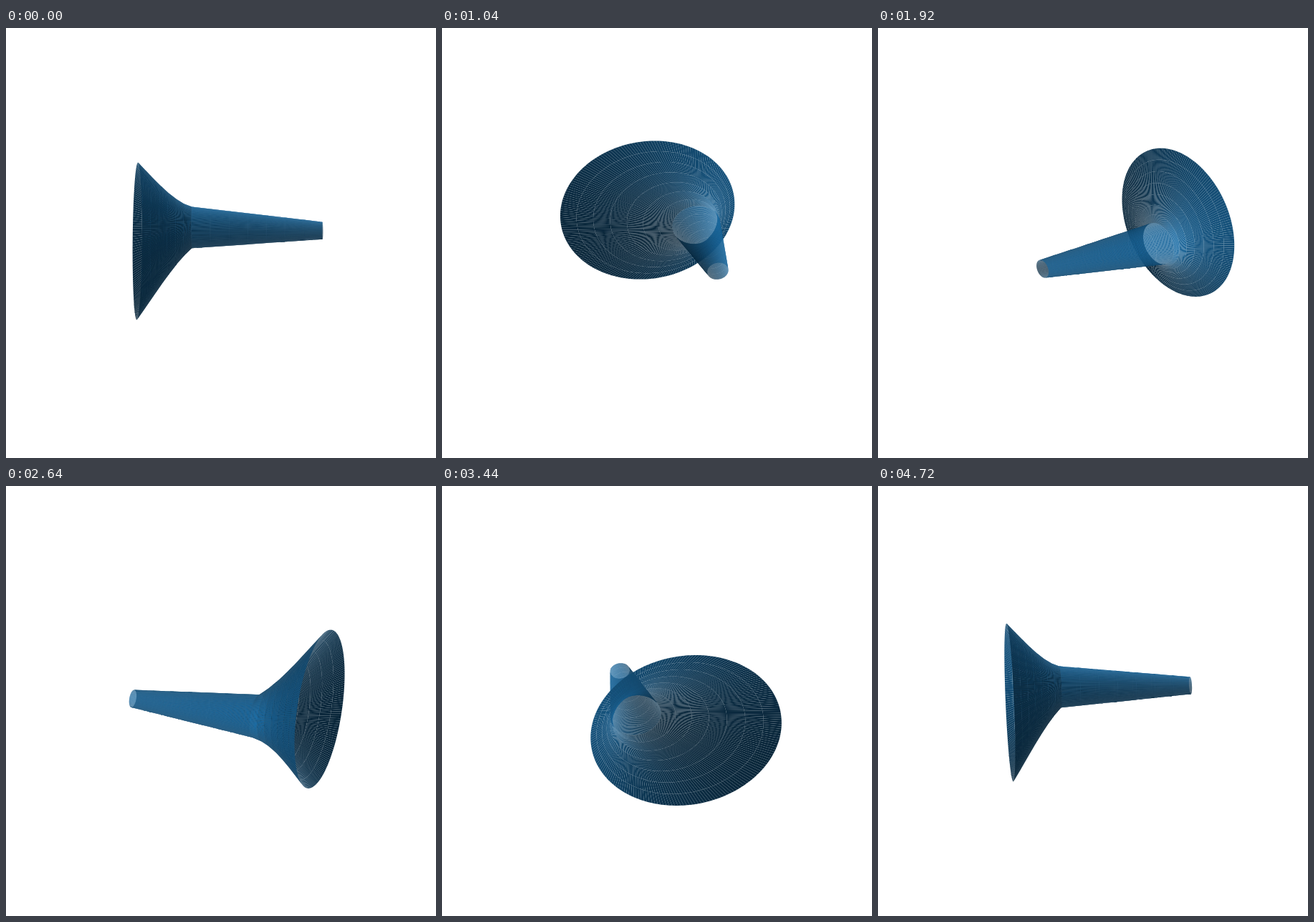
An HTML page with a canvas for the animation above (4.8 s loop, 600 by 600 pixels).

```html
<!DOCTYPE html>
<html lang="en">
<head>
<meta charset="utf-8">
<title>Turning funnel</title>
<style>
  html, body { margin: 0; width: 100%; height: 100%; overflow: hidden; background: #fff; }
  canvas { display: block; width: 600px; height: 600px; }
</style>
</head>
<body>
<canvas id="stage" width="600" height="600"></canvas>
<script>
const ctx = document.getElementById('stage').getContext('2d');
const TAU = Math.PI * 2;
const STEP = 80, STEPS = 60;
const AROUND = 200, BELL = 7, STEM = 7;
const CX = 313.6, CY = 296.8, EYE = 2513;
const ELEV = 20 * Math.PI / 180, SE = Math.sin(ELEV), CE = Math.cos(ELEV);
const FLAT = 0.82;
const BASE = [31, 119, 180];
const LIGHT = [-2 / 3, 2 / 3, 1 / 3];

const mix = (a, b, t) => a + (b - a) * t;

// Each ring lies in a plane of constant x: [x, y centre, radius]
function bellRing(t) {
  const bend = t * (1 - t);
  return [mix(-130, -55.5, t), 55 * (t - 0.25 * bend), mix(130, 35, t + bend * (0.15 + 0.32 * t))];
}
function stemRing(t) {
  return [mix(-55.5, 130, t), mix(55, 42, t), mix(35, 14.5, t)];
}

const rings = [];
for (let i = 0; i <= BELL; i++) rings.push(bellRing(i / BELL));
for (let i = 1; i <= STEM; i++) rings.push(stemRing(i / STEM));

const points = [];
for (const [x, y, r] of rings) {
  for (let j = 0; j < AROUND; j++) {
    const a = j / AROUND * TAU;
    points.push([x, y + r * Math.cos(a), FLAT * r * Math.sin(a)]);
  }
}

function shade(a, b, d) {
  const [ux, uy, uz] = [b[0] - a[0], b[1] - a[1], (b[2] - a[2]) / FLAT];
  const [vx, vy, vz] = [d[0] - a[0], d[1] - a[1], (d[2] - a[2]) / FLAT];
  const n = [uy * vz - uz * vy, uz * vx - ux * vz, ux * vy - uy * vx];
  const dot = (n[0] * LIGHT[0] + n[1] * LIGHT[1] + n[2] * LIGHT[2]) / Math.hypot(...n);
  const k = 0.65 + 0.35 * dot;
  return `rgb(${BASE.map(c => Math.round(c * k)).join()})`;
}

const quads = [];
for (let i = 0; i < rings.length - 1; i++) {
  for (let j = 0; j < AROUND; j++) {
    const next = (j + 1) % AROUND;
    const a = i * AROUND + j, b = i * AROUND + next;
    const c = b + AROUND, d = a + AROUND;
    quads.push({ a, b, c, d, depth: 0, fill: shade(points[a], points[b], points[d]) });
  }
}

function project([x, y, z], cos, sin) {
  const near = x * sin - y * cos;
  const depth = near * CE + z * SE;
  const f = EYE / (EYE - depth);
  return [CX + (x * cos + y * sin) * f, CY + (near * SE - z * CE) * f, depth];
}

function draw(step) {
  const turn = step / STEPS * TAU;
  const cos = Math.cos(turn), sin = Math.sin(turn);
  const p = points.map(q => project(q, cos, sin));
  for (const q of quads) q.depth = p[q.a][2] + p[q.b][2] + p[q.c][2] + p[q.d][2];
  quads.sort((m, n) => m.depth - n.depth);

  ctx.fillStyle = '#fff';
  ctx.fillRect(0, 0, 600, 600);
  // Opaque facets: their smoothed edges leave the fine pale seams
  for (const q of quads) {
    ctx.fillStyle = q.fill;
    ctx.beginPath();
    ctx.moveTo(p[q.a][0], p[q.a][1]);
    ctx.lineTo(p[q.b][0], p[q.b][1]);
    ctx.lineTo(p[q.c][0], p[q.c][1]);
    ctx.lineTo(p[q.d][0], p[q.d][1]);
    ctx.closePath();
    ctx.fill();
  }
}

let shown = -1;
function tick() {
  const step = Math.floor(performance.now() / STEP) % STEPS;
  if (step !== shown) draw(shown = step);
  requestAnimationFrame(tick);
}
tick();
</script>
</body>
</html>
```
